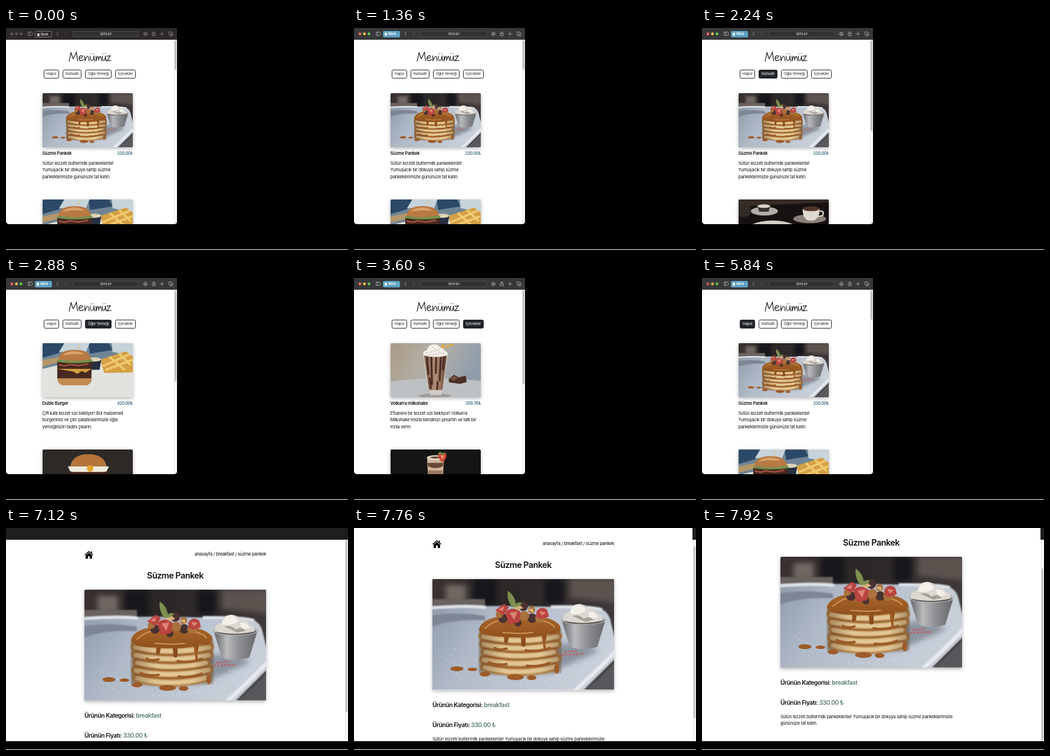
These frames come from a looping animation (580 by 378 pixels, 8000 ms). An HTML page:

```html
<!DOCTYPE html>
<html lang="tr">
<head>
<meta charset="utf-8">
<title>Menümüz</title>
<style>
html, body { margin: 0; width: 100%; height: 100%; overflow: hidden; background: #000; }
body { position: relative; font: 7.4px/11.6px Inter, "Liberation Sans", sans-serif; letter-spacing: -.03em; color: #101214; }
body * { box-sizing: border-box; }
div, p, h2, b, svg { position: absolute; margin: 0; white-space: nowrap; }
.stage { left: 0; top: 0; width: 580px; height: 378px; overflow: hidden; background: #000; }
.edge { left: 0; top: 377px; width: 580px; height: 1px; background: #fff; }

/* timed parts: every one shares the 8 s loop */
.timed { animation: 8s step-end infinite; }
.window { left: 0; top: 0; width: 290px; height: 333.5px; border-radius: 0 0 5px 5px; overflow: hidden; background: #fff; animation-name: leave; }
.detail { left: 0; top: 0; width: 580px; height: 363px; overflow: hidden; background: #fff; visibility: hidden; animation-name: enter; }
@keyframes leave { 89% { visibility: hidden } }
@keyframes enter { 89% { visibility: visible } }

.bar { left: 0; top: 0; width: 290px; height: 20px; }
.idle { background: #2d292b; }
.focus { background: #37383a; visibility: hidden; animation-name: focus; }
@keyframes focus { 17% { visibility: visible } 89% { visibility: hidden } }
.signs { visibility: hidden; animation-name: signs; }
@keyframes signs { 70% { visibility: visible } 89% { visibility: hidden } }
.url { left: 113px; top: 5px; width: 112px; height: 10px; border-radius: 2px; border: .5px solid #48494b; background: #303133; color: #fff; font-size: 5.4px; font-weight: 500; line-height: 9px; text-align: center; }
.pill { left: 49px; top: 4.5px; width: 29px; height: 11px; border-radius: 2.5px; padding-left: 9px; color: #fff; font-size: 5.5px; line-height: 11px; font-weight: 600; }
.pill::before { content: ""; position: absolute; left: 3px; top: 3px; width: 4px; height: 5px; border-radius: 1px; background: currentColor; }
.idle .pill { border: .6px solid #777; line-height: 10px; color: #c4c2c3; padding-left: 8.4px; }
.focus .pill { background: #5a9fc0; }

.btn { top: 71px; height: 15px; border: .8px solid #212529; border-radius: 2.6px; font-size: 6.3px; line-height: 13.6px; text-align: center; animation: 8s linear infinite; }
@keyframes all { 0%, 51% { background: #fff; color: #212529 } 53%, 100% { background: #212529; color: #fff } }
@keyframes morning { 0%, 20%, 34.01%, 100% { background: #fff; color: #212529 } 22%, 34% { background: #212529; color: #fff } }
@keyframes noon { 0%, 31%, 45%, 100% { background: #fff; color: #212529 } 33%, 44.99% { background: #212529; color: #fff } }
@keyframes drinks { 0%, 39%, 58%, 100% { background: #fff; color: #212529 } 41%, 57.99% { background: #212529; color: #fff } }

.list { left: 61.5px; top: 110.5px; width: 153.5px; height: 223px; visibility: hidden; }
.list.a { animation-name: listA }
.list.b { animation-name: listB }
.list.c { animation-name: listC }
.list.d { animation-name: listD }
@keyframes listA { 0% { visibility: inherit } 22% { visibility: hidden } 58%, 100% { visibility: inherit } 89% { visibility: hidden } }
@keyframes listB { 22% { visibility: inherit } 34% { visibility: hidden } }
@keyframes listC { 34% { visibility: inherit } 45% { visibility: hidden } }
@keyframes listD { 45% { visibility: inherit } 58% { visibility: hidden } }
.photo { left: 0; top: 0; width: 153.5px; height: 92.5px; border-radius: 2px; box-shadow: 0 2px 6px rgba(0,0,0,.3); }
.second { top: 181.5px; }
.list b { left: 0; top: 97px; font-weight: 600; }
.list .price { left: auto; right: 0; font-size: 6.9px; font-weight: 700; letter-spacing: -.05em; color: #527d92; }
.list p { left: 0; top: 114px; }

.track { right: 0; top: 20px; width: 5.5px; height: 400px; background: #fafafa; border-left: .6px solid #e4e4e4; }
.thumb { right: 1px; top: 21px; width: 3px; border-radius: 1.5px; background: #c1c1c1; }
.window .thumb { height: 50px; animation-name: thumb; }
@keyframes thumb { 0% { height: 50px } 22% { height: 155px } 45% { height: 160px } 58%, 100% { height: 50px } }

.detail .thumb { height: 293px; animation: thumbDown 8s linear infinite; }
@keyframes thumbDown { 0%, 96.5% { transform: none } 99%, 100% { transform: translateY(48px) } }
.scroll { left: 0; top: 0; width: 574px; height: 430px; animation: scroll 8s linear infinite; }
@keyframes scroll { 0%, 96.5% { transform: none } 97% { transform: translateY(-18px) } 98% { transform: translateY(-45px) } 99%, 100% { transform: translateY(-56px) } }
.top { top: 0; height: 20px; background: #1e1e1e; }
.top.main { left: 0; width: 574px; animation-name: retract; }
.top.corner { right: 0; width: 6px; }
@keyframes retract { 97% { visibility: hidden } }
.detail h2 { left: 0; top: 71.4px; width: 574px; text-align: center; font-size: 14.4px; line-height: 20px; font-weight: 570; letter-spacing: -.037em; }
.detail .photo { left: 133px; top: 105px; width: 308px; height: 188.5px; }
.fact { left: 133px; font-size: 10.2px; line-height: 14px; font-weight: 600; letter-spacing: -.04em; }
.fact i { font-style: normal; color: #5b7d79; }
.crumbs { right: 133px; top: 38.8px; color: #000; }
</style>
</head>
<body>
<svg width="0" height="0" aria-hidden="true">
  <defs>
    <linearGradient id="plate" x2="1" y2=".3"><stop stop-color="#8f9aaa"/><stop offset=".35" stop-color="#b0bac8"/><stop offset="1" stop-color="#c9d0da"/></linearGradient>
    <linearGradient id="steel"><stop stop-color="#5f6165"/><stop offset=".3" stop-color="#b9babc"/><stop offset=".6" stop-color="#8c8d90"/><stop offset="1" stop-color="#66676a"/></linearGradient>
    <linearGradient id="wood" x2="1"><stop stop-color="#3a3230"/><stop offset=".45" stop-color="#2b2726"/><stop offset="1" stop-color="#40383a"/></linearGradient>
    <linearGradient id="syrup" y2="1" x2="0"><stop stop-color="#a9672c"/><stop offset="1" stop-color="#874818"/></linearGradient>
    <linearGradient id="shade"><stop stop-color="#4a2a10" stop-opacity=".4"/><stop offset=".3" stop-color="#4a2a10" stop-opacity="0"/><stop offset=".75" stop-color="#4a2a10" stop-opacity="0"/><stop offset="1" stop-color="#4a2a10" stop-opacity=".35"/></linearGradient>
    <linearGradient id="wall" x2="1" y2=".3"><stop stop-color="#a99b87"/><stop offset=".5" stop-color="#b4b0a8"/><stop offset="1" stop-color="#8f9dab"/></linearGradient>
    <linearGradient id="shake"><stop stop-color="#7c5947"/><stop offset=".5" stop-color="#b18d77"/><stop offset="1" stop-color="#694837"/></linearGradient>
    <filter id="far" x="-20%" y="-20%" width="140%" height="140%"><feGaussianBlur stdDeviation="4"/></filter>
    <filter id="near" x="-20%" y="-20%" width="140%" height="140%"><feGaussianBlur stdDeviation="1"/></filter>
    <path id="layers" d="M90 148q58 15 116 -1M88 135q60 13 122 -1M91 122q57 13 114 0M88 109q60 13 122 0M87 96q62 13 124 0" fill="none" stroke-linecap="round"/>
  </defs>

  <symbol id="pancake" viewBox="0 0 308 186" preserveAspectRatio="xMidYMid slice">
    <path fill="url(#wood)" d="M0 0h308v186H0z"/>
    <g filter="url(#far)">
      <path fill="#6f6762" d="M24 10h34v28H24z"/><path fill="#17171a" d="M70 0h40v46H70zM190 0h32v42h-32z"/>
      <path fill="#5b5350" d="M232 0h80v40l-80 -8z"/>
    </g>
    <g filter="url(#near)">
      <path fill="#6b625f" d="M0 34h90v16H0z"/>
      <path fill="url(#plate)" d="M-5 48Q120 42 282 50Q296 54 300 70L314 128L250 192H-5z"/>
      <path fill="none" stroke="#dfe4ea" stroke-width="5" d="M-5 49Q60 44 92 48M200 47Q270 46 286 52"/>
      <path fill="#7d8694" d="M-5 62Q40 54 90 62v8Q40 66 -5 82z"/>
      <path fill="none" stroke="#e9edf2" stroke-width="6" d="M312 118Q280 152 236 192"/>
      <path fill="#59585c" d="M314 132L314 192H252Q285 164 314 132z"/>
    </g>
    <path fill="#69717f" opacity=".6" filter="url(#far)" d="M80 144q70 32 150 0l50 -22l-30 -16l-50 6z"/>
    <path fill="none" stroke="#eef1f5" stroke-width="1.5" stroke-linecap="round" stroke-dasharray="0 11" d="M18 130q70 35 90 45t130 -10M40 118q-20 30 20 56M180 176q50 -20 70 -45"/>
    <path fill="url(#steel)" d="M218 68h74l-14 46q-22 8 -46 0z"/>
    <ellipse cx="255" cy="69" rx="38" ry="8" fill="#b4b3b2"/><ellipse cx="255" cy="70" rx="34" ry="6" fill="#5f5c5b"/>
    <path fill="#dcd7d0" d="M220 70q0 -13 14 -15q-1 -12 14 -13q12 1 13 9q14 -3 18 8q9 2 8 11q-34 8 -67 0z"/>
    <path fill="#f3f0ea" d="M232 58q2 -14 15 -15q10 2 12 11q-14 8 -27 4zM262 56q12 -3 17 8l-12 4z"/>
    <path fill="#a7a099" d="M236 62q12 -3 19 5q10 -6 17 2l-14 3z"/>
    <path fill="none" stroke="#b56a69" stroke-width="3" stroke-dasharray="4 2" d="M218 128l38 -2M222 123l24 -2"/>
    <g filter="url(#near)">
      <use href="#layers" stroke="#b47b3d" stroke-width="16"/>
      <use href="#layers" stroke="#e2c795" stroke-width="7.5" transform="translate(0 1)"/>
      <path fill="none" stroke="#8f5422" stroke-width="2" d="M86 116q60 14 126 0M88 129q60 12 120 0M86 142q60 14 124 -1M88 103q60 14 122 0"/>
      <path fill="url(#shade)" d="M80 84h138v74q-70 14 -138 0z"/>
    </g>
    <path fill="url(#syrup)" d="M80 84q5 -20 55 -24q65 -1 80 18q4 9 -4 13q-10 4 -17 0l-2 13q-5 3 -6 0l-1 -9q-20 4 -27 3v14q-4 4 -7 0l-1 -14h-20l-2 9q-5 3 -6 -1v-9q-42 0 -42 -13z"/>
    <path fill="none" stroke="#cf9554" stroke-width="2" stroke-linecap="round" d="M90 83q14 -13 32 -15M184 70q18 4 22 11M120 90q30 3 50 0"/>
    <path fill="none" stroke="#9b5a25" stroke-width="4" stroke-linecap="round" d="M106 116q8 5 20 1M158 120q20 4 40 -4M188 98l2 20M96 140q15 6 30 3M160 146q20 3 38 -5"/>
    <g fill="#9d5b28"><ellipse cx="43" cy="151" rx="11" ry="4"/><ellipse cx="69" cy="152" rx="8" ry="3"/><ellipse cx="90" cy="160" rx="9" ry="4"/><ellipse cx="141" cy="165" rx="14" ry="5"/><ellipse cx="168" cy="166" rx="8" ry="4"/><ellipse cx="210" cy="151" rx="4" ry="8"/></g>
    <g fill="#493230"><circle cx="120" cy="66" r="8"/><circle cx="154" cy="46" r="8"/><circle cx="169" cy="66" r="8"/><circle cx="145" cy="74" r="6"/></g>
    <g fill="#a9713c"><circle cx="156" cy="62" r="8"/><circle cx="114" cy="60" r="6"/><circle cx="182" cy="66" r="8"/><circle cx="168" cy="52" r="6"/></g>
    <path fill="#b9443f" d="M124 56q12 -12 26 0l-3 17l-17 3zM176 55q8 -11 18 -3l3 11q-15 8 -21 0zM107 53l15 -11l8 6l-9 13z"/>
    <path fill="#dc8577" d="M131 57l13 -2l-5 14zM181 54l11 2l-7 6zM112 52l10 -6l-2 8z"/>
    <path fill="#d9b17c" d="M136 46l10 -4l8 7l-10 4zM161 51l9 -1l2 8z"/>
    <path fill="#7d9050" d="M136 48q-10 -12 -8 -28q13 8 14 26zM137 47q6 -10 15 -7q-5 9 -15 7z"/>
  </symbol>

  <symbol id="burger" viewBox="0 0 308 186" preserveAspectRatio="xMidYMid slice">
    <path fill="#6f8596" d="M0 0h308v186H0z"/>
    <g filter="url(#near)">
      <path fill="#2c4968" d="M0 0h74l-18 34L0 50zM156 0h70l12 24l-76 12z"/>
      <path fill="#c6d3da" d="M74 0h86l-12 30H56zM236 0h72v45l-70 -15z"/>
      <path fill="#b6966b" d="M0 58l60 -12l-6 20L0 80z"/>
      <path fill="#e2e3df" d="M0 88q150 -40 308 -10v108H0z"/>
    </g>
    <path fill="#d6a045" d="M196 56l88 -28l24 18v54l-98 2z"/>
    <path stroke="#f0cc72" stroke-width="7" d="M205 78l92 -40M214 92l92 -35M228 46l52 46M260 36l40 38"/>
    <path fill="#263040" d="M152 56h48l-6 35h-37z"/><ellipse cx="176" cy="56" rx="24" ry="7" fill="#ded3b5"/>
    <path fill="#b87942" d="M54 56q4 -33 56 -33q50 0 55 33q-52 11 -111 0z"/>
    <path fill="#d9a268" d="M68 42q14 -15 44 -14q22 2 30 11q-36 -5 -74 3z"/>
    <path fill="#74914a" d="M50 57q58 9 118 -2l2 9q-62 14 -121 2z"/>
    <path fill="#482820" d="M50 64q60 9 118 0l-2 57H50z"/>
    <path stroke="#9e5440" stroke-width="5" d="M55 74l22 4l15 -5l30 4l34 -6" fill="none"/>
    <path fill="#d5a03e" d="M50 88h116l-20 13l-12 -6l-16 10l-14 -8z"/>
    <path fill="#c38b52" d="M50 120h118q-2 22 -20 24H70q-18 -2 -20 -24z"/>
    <path stroke="#dcc58f" stroke-width="3" d="M120 24L128 0"/>
  </symbol>

  <symbol id="country" viewBox="0 0 308 186" preserveAspectRatio="xMidYMid slice">
    <path fill="#161211" d="M0 0h308v186H0z"/>
    <path fill="#362b25" d="M0 0h308v10L0 24z"/>
    <ellipse cx="18" cy="38" rx="26" ry="22" fill="#312a25"/>
    <ellipse cx="88" cy="40" rx="46" ry="15" fill="#b1aca5"/><path fill="#35302d" d="M64 22h44l-6 20H70z"/><ellipse cx="86" cy="23" rx="22" ry="6" fill="#d8d2c7"/>
    <ellipse cx="242" cy="66" rx="56" ry="15" fill="#8b8178"/>
    <path fill="#e0d9cf" d="M218 32h58q0 34 -20 40h-20q-18 -8 -18 -40z"/><ellipse cx="247" cy="32" rx="29" ry="8" fill="#503425"/>
    <path fill="none" stroke="#d1c8bc" stroke-width="5" d="M276 40q18 0 10 15l-14 4"/>
    <ellipse cx="116" cy="118" rx="100" ry="46" fill="#d5d0c8"/><path fill="#774a28" d="M46 112q50 -42 128 -4q-44 46 -128 4z"/><circle cx="122" cy="112" r="22" fill="#f1e7cf"/><circle cx="122" cy="112" r="9" fill="#e0a331"/>
  </symbol>

  <symbol id="egg" viewBox="0 0 308 186" preserveAspectRatio="xMidYMid slice">
    <path fill="#2c2927" d="M0 0h308v186H0z"/><path fill="#8d7254" d="M0 130h308v56H0z"/>
    <path fill="#b6743a" d="M94 58q8 -42 62 -42t62 42z"/><path fill="#efe9dd" d="M86 58h140l-8 17q-60 17 -124 0z"/>
    <circle cx="162" cy="65" r="11" fill="#e5a62e"/><path fill="#45281e" d="M92 77h128v28H92z"/><path fill="#b7793f" d="M92 105h128q0 30 -20 32h-88q-20 -2 -20 -32z"/>
  </symbol>

  <symbol id="milkshake" viewBox="0 0 308 186" preserveAspectRatio="xMidYMid slice">
    <path fill="url(#wall)" d="M0 0h308v186H0z"/>
    <path fill="#bdc0c2" filter="url(#near)" d="M-5 132q140 -22 318 -2v60H-5z"/>
    <path fill="#9d9c99" d="M90 180q58 -16 118 -2l-14 8h-80z"/>
    <path fill="none" stroke="#e1ad32" stroke-width="5" d="M172 38l6 -36M178 14l36 -9"/>
    <path fill="url(#shake)" d="M114 42h78l-14 122q-24 8 -48 0z"/>
    <path fill="none" stroke="#472a21" stroke-width="6" stroke-linecap="round" d="M124 50l5 56M139 48l2 92M155 46l-1 56M171 50l-4 76M182 48l-4 42M133 120l4 34M160 132l-2 26"/>
    <path fill="none" stroke="#ded8d2" stroke-width="2" d="M113 42l16 122M193 42l-16 122"/>
    <path fill="#d0cbc6" d="M130 160h48l-6 18h-36z"/>
    <path fill="#f3eee7" d="M112 42q-5 -16 12 -18q2 -16 20 -20q18 -2 26 12q10 0 14 10q12 4 10 16q-38 11 -82 0z"/>
    <path stroke="#70473a" stroke-width="2" stroke-dasharray="2 7" d="M122 34l48 -14M126 42l58 -10M142 14l24 18"/>
    <path fill="#4b3028" d="M198 122l18 -14l16 9l24 -6l3 22l-22 6l-38 -5z"/><path fill="#755244" d="M201 122l16 -10l12 8l-14 8z"/>
  </symbol>

  <symbol id="dark" viewBox="0 0 308 186" preserveAspectRatio="xMidYMid slice">
    <path fill="#161515" d="M0 0h308v186H0z"/>
    <path fill="#cdb59c" d="M124 28h58l-8 140h-42z"/><path fill="#674736" d="M126 46h54l-2 12q-26 12 -50 0z"/>
    <path fill="#9c785f" d="M128 72h49l-6 90h-36z"/>
    <ellipse cx="153" cy="28" rx="29" ry="8" fill="#e7dac8"/><path fill="#624637" d="M132 28q20 -8 40 0q-20 7 -40 0z"/>
    <path fill="#cf4937" d="M162 18q12 -11 28 -3q2 18 -14 29q-14 -10 -14 -26z"/><path fill="#e99a80" d="M170 20l12 1l-6 14z"/><path fill="#6f873e" d="M160 17l8 -10l8 5l12 -3l-5 9z"/>
  </symbol>

  <symbol id="tools" viewBox="0 0 290 20">
    <g fill="none" stroke="#b5b5b6" stroke-width=".8" stroke-linecap="round" stroke-linejoin="round">
      <rect x="37.5" y="7" width="7" height="5.8" rx="1"/><path d="M40 7v5.8M88.5 7.2L86 10l2.5 2.8"/>
      <path stroke="#646466" d="M100 7.2l2.5 2.8L100 12.8"/>
      <path d="M207.5 8h4M209.5 7v1M208 11.5q3 -1 3 -3.4M208 9q1 2 3 2.5M211.5 12.5l1.5 -4l1.5 4M212 11.3h2" stroke="#ddd"/>
      <path d="M221 9a2.2 2.2 0 1 0 .2 2M221.2 7.5v1.8h-1.8" stroke="#ddd"/>
      <circle cx="236.3" cy="10" r="3"/><path d="M236.3 8.2v3.3M235 10.3l1.3 1.3l1.3 -1.3"/>
      <path d="M249.3 8.8h-1.3v4.4h5.2V8.8h-1.3M250.6 11V6.2M249.2 7.5l1.4 -1.4L252 7.5M264.5 7.2v5.6M261.7 10h5.6"/>
      <rect x="276.3" y="6.7" width="4.6" height="4.6" rx=".8"/><path d="M282 8.6h.8v4.6h-4.6v-.8"/>
    </g>
  </symbol>
</svg>

<div class="stage">
  <div class="window timed">
    <div class="bar idle">
      <svg width="290" height="20"><g fill="#5d5a5c"><circle cx="10" cy="10" r="2.4"/><circle cx="17.7" cy="10" r="2.4"/><circle cx="25.4" cy="10" r="2.4"/></g><use href="#tools" opacity=".75"/></svg>
      <div class="pill">Work</div><div class="url">127.0.0.1</div>
    </div>
    <div class="bar focus timed">
      <svg width="290" height="20">
        <circle cx="10" cy="10" r="2.4" fill="#ec6a5e"/><circle cx="17.7" cy="10" r="2.4" fill="#f4bf4f"/><circle cx="25.4" cy="10" r="2.4" fill="#61c554"/>
        <path class="signs timed" fill="none" stroke="#4a2b12" stroke-width=".7" d="M9 9l2 2M11 9l-2 2M16.3 10h2.8M24.3 11.1l2.2 -2.2"/>
        <use href="#tools"/>
      </svg>
      <div class="pill">Work<svg style="left:23.5px;top:4px" width="5" height="4"><path stroke="#cfe5f0" stroke-width=".6" fill="none" d="M1 1l1.2 1.2l1.2 -1.2"/></svg></div>
      <div class="url">127.0.0.1</div>
    </div>

    <svg style="left:100px;top:34px" width="86" height="30" viewBox="100 34 86 30" role="img" aria-label="Menümüz">
      <title>Menümüz</title>
      <path fill="none" stroke="#222" stroke-width="1.25" stroke-linecap="round" stroke-linejoin="round" d="M107 56.5Q109 49 110.3 41.5Q112 48 114 52.5Q117 47 119.5 41Q120 49 121.6 56M123.8 51.5Q130 51 129.8 48Q128.5 45.5 125.5 48Q122.4 52 125 55Q128 57 131.5 53.5M133.4 47.5L134 56Q135.8 49.5 138.3 48Q140.6 48.5 140.8 56M143 47.8Q142.4 55.5 145.5 55.6Q148.5 55 149.3 47.5Q149 53 150.8 56M152.6 47.8L153 56Q154.2 49 156 48.4Q157.4 50 157.2 55Q158.4 48.8 160 48.2Q161.6 50 162 56M163.5 47.8Q163 55.5 165.6 55.6Q168 55 168.6 47.5Q168.5 53 170 56M171 48.2Q174 47.8 177.2 47.2Q174 51.5 171.3 55.8Q174.5 55 178 55.4M144.5 43.8v.3M148.3 43.4v.3M164.8 43.8v.3M168.3 43.4v.3"/>
    </svg>
    <div class="btn" style="left:64px;width:26px;animation-name:all">Hapsi</div>
    <div class="btn" style="left:96px;width:32px;animation-name:morning">Kahvaltı</div>
    <div class="btn" style="left:134px;width:45px;animation-name:noon">Öğle Yemeği</div>
    <div class="btn" style="left:185px;width:35px;animation-name:drinks">İçecekler</div>

    <div class="list a timed">
      <svg class="photo"><use href="#pancake"/></svg>
      <b>Süzme Pankek</b><b class="price">330.00₺</b>
      <p>Sütün lezzeti buttermilk pankeklerde!<br>Yumuşacık bir dokuya sahip süzme<br>pankeklerimizle gününüze tat katın.</p>
      <svg class="photo second"><use href="#burger"/></svg>
    </div>
    <div class="list b timed">
      <svg class="photo"><use href="#pancake"/></svg>
      <b>Süzme Pankek</b><b class="price">330.00₺</b>
      <p>Sütün lezzeti buttermilk pankeklerde!<br>Yumuşacık bir dokuya sahip süzme<br>pankeklerimizle gününüze tat katın.</p>
      <svg class="photo second"><use href="#country"/></svg>
    </div>
    <div class="list c timed">
      <svg class="photo"><use href="#burger"/></svg>
      <b>Duble Burger</b><b class="price">420.00₺</b>
      <p>Çift katlı lezzet sizi bekliyor! Bol malzemeli<br>burgerimiz ve çıtır patateslerimizle öğle<br>yemeğinizin tadını çıkarın.</p>
      <svg class="photo second"><use href="#egg"/></svg>
    </div>
    <div class="list d timed">
      <svg class="photo"><use href="#milkshake"/></svg>
      <b>Volkarra milkshake</b><b class="price">209.70₺</b>
      <p>Efsanevi bir lezzet sizi bekliyor! Volkarra<br>Milkshake'imizle kendinizi şımartın ve tatlı bir<br>mola verin.</p>
      <svg class="photo second"><use href="#dark"/></svg>
    </div>
    <div class="track"></div><div class="thumb timed"></div>
  </div>

  <div class="detail timed">
    <div class="scroll">
      <svg style="left:133px;top:39px" width="15" height="13.5" viewBox="0 0 15 13.5"><path d="M7.5 0L15 6.4l-.9 1.1L7.5 1.9L.9 7.5L0 6.4zM11 .9h2v3.3l-2 -1.8zM7.5 3L13 7.7v5.1q0 .5 -.5 .5H9V9H6v4.3H2.5q-.5 0 -.5 -.5V7.7z"/></svg>
      <p class="crumbs">anasayfa / breakfast / süzme pankek</p>
      <h2>Süzme Pankek</h2>
      <svg class="photo"><use href="#pancake"/></svg>
      <p class="fact" style="top:312px">Ürünün Kategorisi: <i>breakfast</i></p>
      <p class="fact" style="top:346px">Ürünün Fiyatı: <i>330.00 ₺</i></p>
      <p style="left:133px;top:371.5px">Sütün lezzeti buttermilk pankeklerde! Yumuşacık bir dokuya sahip süzme pankeklerimizle<br>gününüze tat katın.</p>
    </div>
    <div class="top main timed"></div><div class="top corner"></div>
    <div class="track"></div><div class="thumb"></div>
  </div>
  <div class="edge"></div>
</div>
</body>
</html>
```
